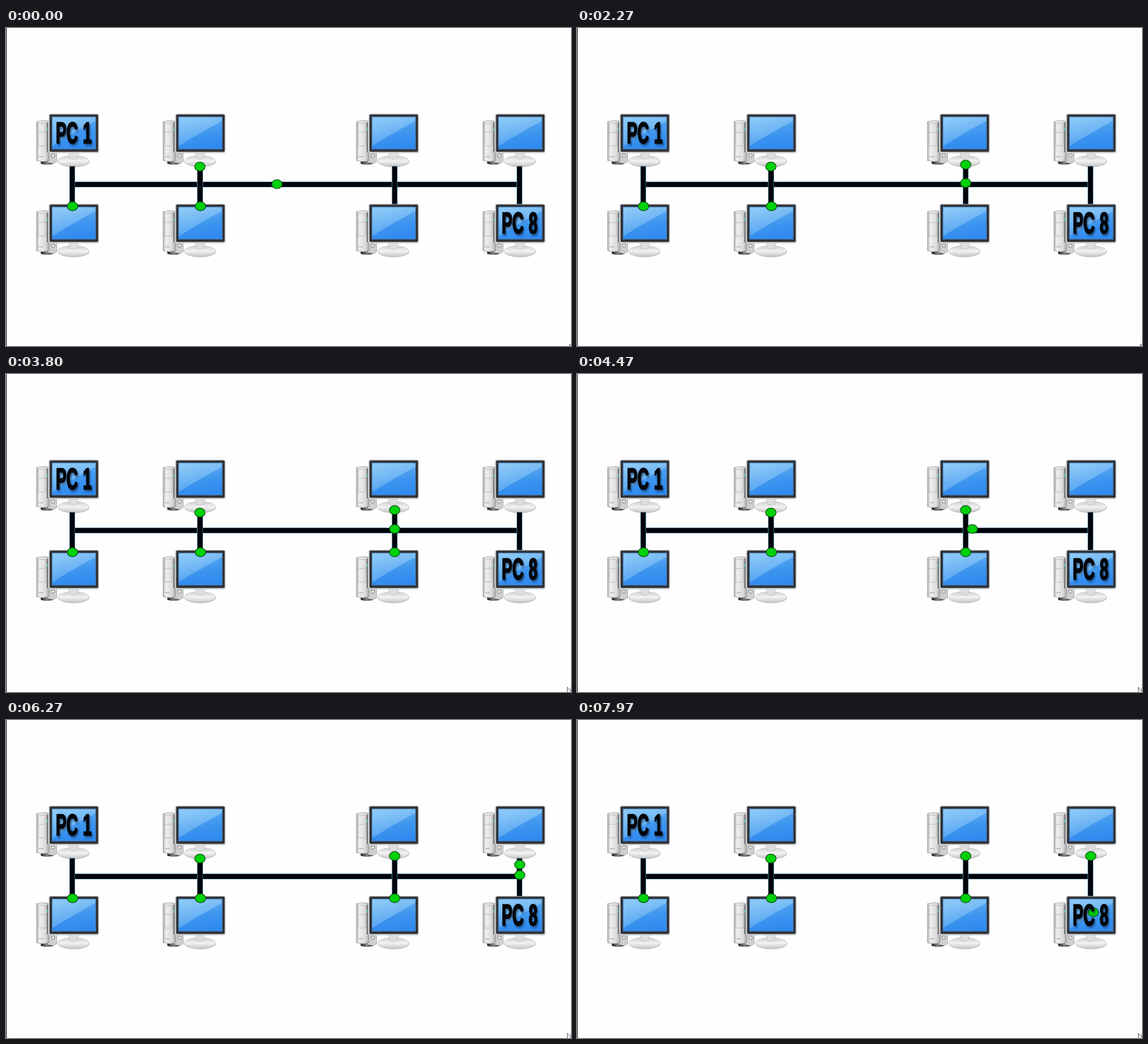
Write an HTML page that moves like this. It is 998 px wide and 561 px high and loops after 8 s.

```html
<!DOCTYPE html>
<html lang="en">
<head>
<meta charset="utf-8">
<title>Bus network</title>
<style>
  html, body { margin: 0; width: 100%; height: 100%; overflow: hidden; background: #fefefe; }
  svg { display: block; width: 100vw; height: 100vh; }

  .label { font: bold 28px "Liberation Sans", Arial, sans-serif; word-spacing: 1px; }
  .label text { stroke-width: 2px; stroke-linejoin: round; vector-effect: non-scaling-stroke; }
  .label .shade { fill: #0a1c38; stroke: #0a1c38; opacity: .55; filter: blur(1px); }
  .label .face { fill: #05070a; stroke: #05070a; }

  .move { animation: 8s cubic-bezier(.455, .03, .515, .955) infinite; }
  .bus { animation-name: bus; }
  .up3 { animation-name: up3; }
  .down3 { animation-name: down3; }
  .up4 { animation-name: up4; }
  .pointer { animation: pointer 8s step-end infinite; }

  @keyframes bus {
    0% { transform: translate(478px, 275.5px); animation-timing-function: cubic-bezier(.333, .667, .667, 1); }
    8.6%, 53.5% { transform: translate(686.5px, 273.5px); }
    68.5% { transform: translate(907.5px, 273.5px); }
    87.4% { transform: translate(907.5px, 273.5px); animation-timing-function: cubic-bezier(.333, 0, .667, .333); }
    94.9% { transform: translate(910px, 309px); animation-timing-function: cubic-bezier(.333, .507, .667, .836); }
    100% { transform: translate(912px, 340.3px); }
  }
  @keyframes up3 {
    0%, 15.1% { transform: translate(686.5px, 273.5px); visibility: hidden; }
    15.2% { transform: translate(686.5px, 273.5px); visibility: visible; }
    30.2%, 100% { transform: translate(686.5px, 240px); visibility: visible; }
  }
  @keyframes down3 {
    0%, 31.7% { transform: translate(686.5px, 273.5px); visibility: hidden; }
    31.8% { transform: translate(686.5px, 273.5px); visibility: visible; }
    46.8%, 100% { transform: translate(686.5px, 314.5px); visibility: visible; }
  }
  @keyframes up4 {
    0%, 70.5% { transform: translate(907.5px, 273.5px); visibility: hidden; }
    70.6% { transform: translate(907.5px, 273.5px); visibility: visible; }
    85.6%, 100% { transform: translate(907.5px, 240px); visibility: visible; }
  }
  @keyframes pointer {
    0% { transform: translate(4px, 5px); }
    47% { transform: none; }
  }
</style>
</head>
<body>
<svg viewBox="0 0 998 561" preserveAspectRatio="none">
  <defs>
    <linearGradient id="screen" x1=".3" y1="0" x2=".5" y2="1">
      <stop offset="0" stop-color="#62aff2"/>
      <stop offset=".6" stop-color="#3c94ee"/>
      <stop offset="1" stop-color="#2f8af0"/>
    </linearGradient>
    <linearGradient id="gloss" x1="0" y1="0" x2=".5" y2="1">
      <stop offset="0" stop-color="#a6d9fb" stop-opacity=".65"/>
      <stop offset="1" stop-color="#a6d9fb" stop-opacity=".25"/>
    </linearGradient>
    <linearGradient id="case">
      <stop offset="0" stop-color="#a9a9a9"/>
      <stop offset=".2" stop-color="#efefef"/>
      <stop offset=".7" stop-color="#dcdcdc"/>
      <stop offset="1" stop-color="#a4a4a4"/>
    </linearGradient>
    <linearGradient id="foot">
      <stop offset="0" stop-color="#1c1c1c"/>
      <stop offset=".5" stop-color="#888"/>
      <stop offset="1" stop-color="#151515"/>
    </linearGradient>
    <linearGradient id="base" x2="0" y2="1">
      <stop offset="0" stop-color="#cecece"/>
      <stop offset=".5" stop-color="#f2f2f2"/>
      <stop offset="1" stop-color="#c8c8c8"/>
    </linearGradient>

    <g id="pc">
      <path d="M61.500 232H83.500V239.500Q72 243 61.500 239.500Z" fill="url(#foot)"/>
      <path d="M74 217H88L89.500 221V236L83 239L74 237Z" fill="#cfcfcf" stroke="#9c9c9c" stroke-width=".8"/>
      <circle cx="83" cy="225" r="3" fill="#eee" stroke="#777" stroke-width="1"/>
      <path d="M54 165Q64 162 74 164L76.500 167V234Q65 237 54 234Z" fill="url(#case)" stroke="#a2a2a2" stroke-width=".9"/>
      <path d="M57 168H70V208H57ZM57 184H70" fill="none" stroke="#b0b0b0" stroke-width=".9"/>
      <path d="M73 167V219" stroke="#5c5c5c" stroke-width="1.600"/>
      <path d="M73 176V181" stroke="#3cc5bd" stroke-width="1.600"/>
      <path d="M58 227H66" stroke="#8c8c8c" stroke-width=".9"/>

      <ellipse cx="119.500" cy="235.500" rx="28" ry="10" fill="#c4c4c4"/>
      <ellipse cx="119" cy="234.500" rx="27.500" ry="9.500" fill="url(#base)" stroke="#c4c4c4" stroke-width=".8"/>
      <path d="M111 220H128L126 230Q119 233 113 230Z" fill="#dedede" stroke="#bcbcbc" stroke-width=".7"/>
      <rect x="75.500" y="151.500" width="88.500" height="69" rx="3" fill="#d6d8d9" stroke="#c2c4c6" stroke-width=".7"/>
      <rect x="77" y="152.500" width="85.800" height="66" rx="2" fill="#2e3136"/>
      <rect x="81.300" y="156.800" width="77.200" height="57" fill="url(#screen)" stroke="#4a6f96" stroke-width="1"/>
      <path d="M82 157.500H158V164Q124 182 82 208Z" fill="url(#gloss)"/>
    </g>
    <g id="row">
      <use href="#pc"/>
      <use href="#pc" x="223.500"/>
      <use href="#pc" x="565"/>
      <use href="#pc" x="788.500"/>
    </g>
    <ellipse id="dot" rx="9.200" ry="7.900" fill="#00d20a" stroke="#0c4a12" stroke-width="1.300"/>
  </defs>

  <rect width="998" height="561" fill="#fefefe"/>
  <rect width="1" height="561" fill="#000"/>

  <use href="#row"/>
  <use href="#row" y="159"/>

  <g fill="#02050a" stroke="#2f6686" stroke-width=".8">
    <path d="M121.500 271.500H337.500V280.500H121.500ZM347.500 271.500H681.500V280.500H347.500ZM691 271.500H902V280.500H691Z"/>
    <path d="M112.500 244H121.500V313H112.500ZM338 244H347.500V313H338ZM682 244H691V310.500H682ZM902.500 244H911.500V310.500H902.500Z"/>
  </g>

  <use href="#dot" x="117.500" y="314.500"/>
  <use href="#dot" x="342.500" y="244.500"/>
  <use href="#dot" x="343.500" y="314.500"/>
  <use href="#dot" class="move bus"/>
  <use href="#dot" class="move up3"/>
  <use href="#dot" class="move down3"/>
  <use href="#dot" class="move up4"/>

  <g class="label" transform="translate(88 203.500) scale(1 1.880)">
    <text class="shade" x="2" y="1.500" aria-hidden="true">PC 1</text>
    <text class="face">PC 1</text>
  </g>
  <g class="label" transform="translate(875.500 362) scale(1 1.880)">
    <text class="shade" x="2" y="1.500" aria-hidden="true">PC 8</text>
    <text class="face">PC 8</text>
  </g>

  <path class="pointer" d="M991.500 562V552.500L998 560.500V553" fill="none" stroke="#555" stroke-width="1"/>
</svg>
</body>
</html>
```
